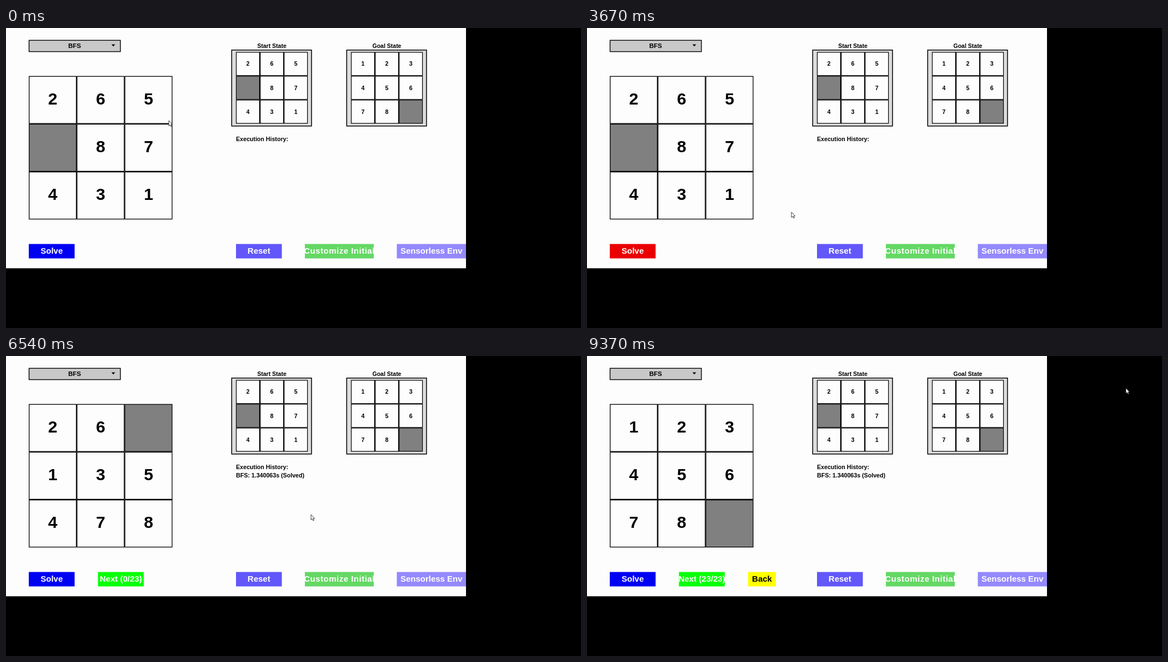
These frames come from a looping animation (1035x541 px, 9.4 s). An HTML page:

```html
<!DOCTYPE html>
<html lang="en">
<head>
<meta charset="utf-8">
<title>8-puzzle solver</title>
<style>
  html, body { margin: 0; width: 100%; height: 100%; overflow: hidden; background: #000; }
  svg { display: block; width: 1035px; height: 541px; }
  text { font-family: "Liberation Sans", Arial, sans-serif; font-weight: bold; }
</style>
</head>
<body>
<svg id="stage" viewBox="0 0 1035 541"></svg>
<script>
const LOOP = 9400;
const START = "2658743 1".length && "2650874310".slice(0, 9).split("");
START.splice(0, 9, ..."265087431");
const GOAL = [..."123456780"];
const MOVES = "DRRULDLURDRUULDRULLDDRR";
const SHIFT = { U: -3, D: 3, L: -1, R: 1 };

const SOLVE_CLICK = 2820, SOLVED = 4780;
const FIRST_MOVE = 5028, MOVE_GAP = 125;
const FINISHED = 7890;

// Pointer tip: time, x, y
const PATH = [
  [0, 293, 167], [350, 293, 167], [1350, 584, 280], [1620, 584, 280],
  [1930, 470, 450], [2300, 250, 497], [2700, 80, 404], [2850, 80, 404],
  [3100, 140, 470], [3670, 368, 332], [4200, 549, 286], [6810, 549, 286],
  [7400, 1002, 150], [8200, 1002, 150], [8700, 976, 100], [9150, 970, 58]
];

const stage = document.getElementById("stage");

function add(tag, attrs, parent = stage) {
  const el = document.createElementNS("http://www.w3.org/2000/svg", tag);
  for (const key in attrs) el.setAttribute(key, attrs[key]);
  return parent.appendChild(el);
}

function box(x, y, width, height, fill, line = 0, parent = stage) {
  return add("rect", {
    x: x + line / 2, y: y + line / 2, width: width - line, height: height - line,
    fill, stroke: line ? "#000" : "none", "stroke-width": line
  }, parent);
}

function label(str, x, y, size, fill = "#000", anchor = "middle", parent = stage) {
  const el = add("text", { x, y, "font-size": size, fill, "text-anchor": anchor }, parent);
  el.textContent = str;
  return el;
}

function button(str, x, width, fill, ink = "#fff") {
  const g = add("g", {});
  const rect = box(x, 389.5, width, 26, fill, 0, g);
  const text = label(str, x + width / 2, 406.5, 15, ink, "middle", g);
  return { g, rect, text };
}

function grid(x, y, cell, size, line, drop) {
  return Array.from({ length: 9 }, (_, i) => {
    const cx = x + (i % 3) * cell, cy = y + Math.floor(i / 3) * cell;
    return {
      rect: box(cx, cy, cell, cell, "#fdfdfd", line),
      text: label("", cx + cell / 2, cy + drop, size)
    };
  });
}

function fillGrid(cells, tiles) {
  cells.forEach((cell, i) => {
    const blank = tiles[i] === "0";
    cell.rect.setAttribute("fill", blank ? "#808080" : "#fdfdfd");
    cell.text.textContent = blank ? "" : tiles[i];
  });
}

function preview(title, x, tiles) {
  label(title, x + 73, 35.7, 10.5);
  box(x, 39, 145.2, 138.5, "#dcdcdc", 1.5);
  fillGrid(grid(x + 8.4, 43.2, 43.1, 10.6, 1.2, 25.2), tiles);
}

// Every board along the solution
const boards = [START];
for (const move of MOVES) {
  const next = [...boards[boards.length - 1]];
  const from = next.indexOf("0"), to = from + SHIFT[move];
  [next[from], next[to]] = [next[to], "0"];
  boards.push(next);
}

box(0, 0, 828, 433.3, "#fdfdfd");
box(40.8, 21.5, 165.8, 21.8, "#c8c8c8", 1.4);
label("BFS", 123.5, 35.5, 11.6);
add("path", { d: "M189.8 29.6h6.8l-3.4 3.6z" });

const board = grid(41, 86.6, 86.2, 30, 1.3, 51.4);
preview("Start State", 405.5, START);
preview("Goal State", 612.5, GOAL);
label("Execution History:", 414, 203.5, 10.65, "#000", "start");
const result = label("BFS: 1.340063s (Solved)", 414, 218.8, 10.65, "#000", "start");

const solve = button("Solve", 41, 82.5, "#0000f2");
const next = button("Next (0/23)", 165.5, 82.5, "#08ff08");
const back = button("Back", 290, 50, "#ffff00", "#000");
button("Reset", 414, 82.5, "#6257f9");
button("Customize Initial", 538, 124, "#64d864").text.setAttribute("letter-spacing", 0.5);
button("Sensorless Env", 703.5, 124.5, "#9489fd");

const pointer = add("path", {
  d: "M0 0V9.6L2.2 7.6L3.8 11L5.4 10.2L3.9 7H6.6Z",
  fill: "#fff", stroke: "#111", "stroke-width": 0.8, "stroke-linejoin": "round"
});

function pointerAt(t) {
  const i = PATH.findIndex(p => p[0] > t);
  if (i < 0) return PATH[PATH.length - 1].slice(1);
  const [t0, x0, y0] = PATH[i - 1], [t1, x1, y1] = PATH[i];
  const u = (t - t0) / (t1 - t0), e = u * u * (3 - 2 * u);
  return [x0 + (x1 - x0) * e, y0 + (y1 - y0) * e];
}

const show = (el, on) => el.setAttribute("visibility", on ? "visible" : "hidden");

let shown = -1;
function draw(now) {
  const t = now % LOOP;
  const count = Math.floor((t - FIRST_MOVE) / MOVE_GAP) + 1;
  const step = Math.max(0, Math.min(MOVES.length, count));
  if (step !== shown) fillGrid(board, boards[shown = step]);

  const busy = t >= SOLVE_CLICK && t < SOLVED;
  solve.rect.setAttribute("fill", busy ? "#ea0000" : "#0000f2");
  show(result, t >= SOLVED);
  show(next.g, t >= SOLVED);
  show(back.g, t >= FINISHED);
  next.text.textContent = `Next (${t >= FINISHED ? MOVES.length : 0}/${MOVES.length})`;

  pointer.setAttribute("transform", `translate(${pointerAt(t)})`);
  requestAnimationFrame(() => draw(performance.now() - began));
}

const began = performance.now();
draw(0);
</script>
</body>
</html>
```
